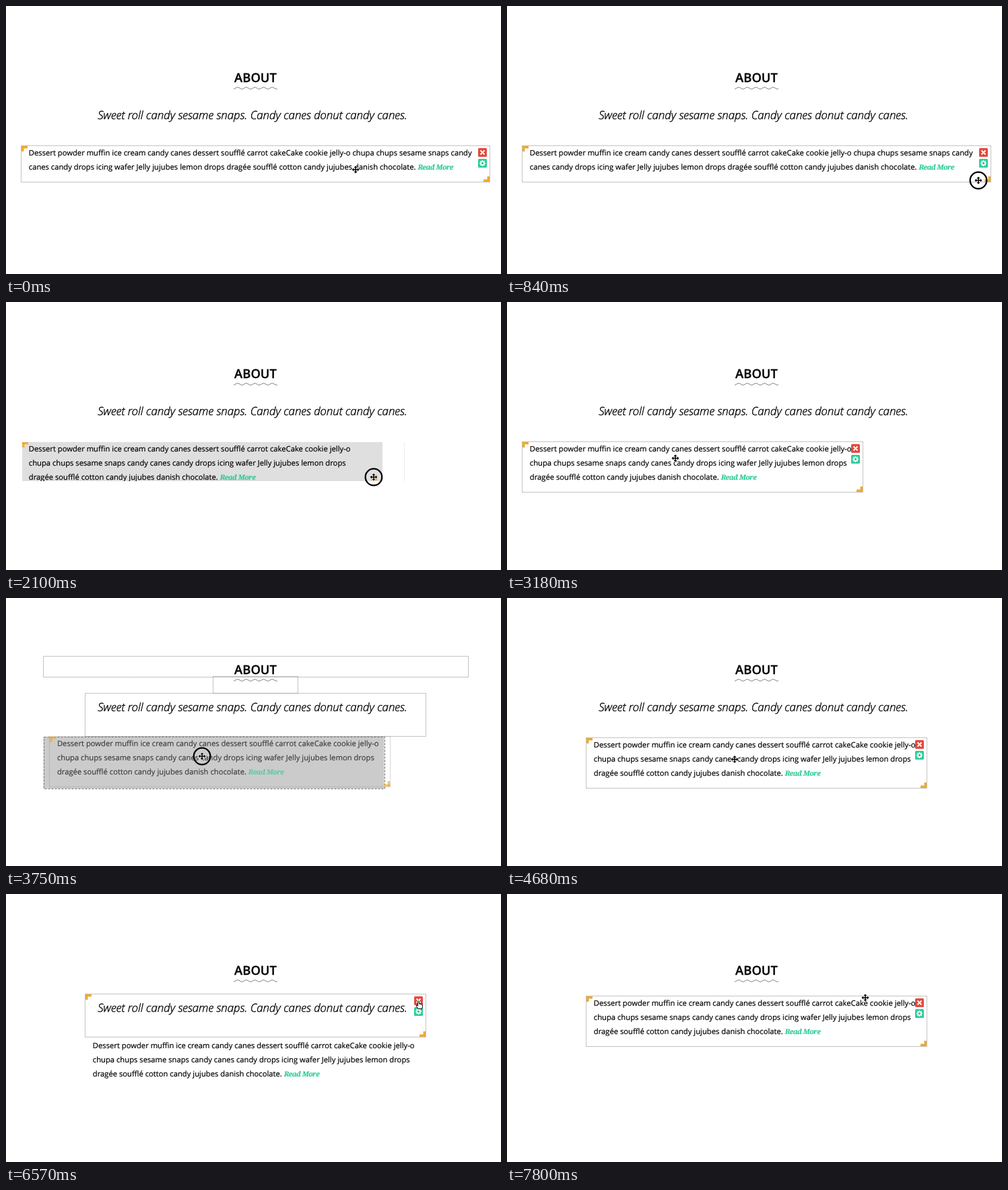
An HTML page with a canvas that plays this animation: 735 by 398 pixels, repeating every 7.83 s.

```html
<!DOCTYPE html>
<html lang="en">
<head>
<meta charset="utf-8">
<title>Block editor</title>
<style>
  html, body { margin: 0; width: 100%; height: 100%; overflow: hidden; background: #fff; }
  canvas { display: block; width: 735px; height: 398px; }
</style>
</head>
<body>
<canvas id="stage" width="735" height="398"></canvas>
<script>
const ctx = document.getElementById('stage').getContext('2d');
const LOOP = 7830;
const COLUMN = 63.2;
const INK = '#000', ORANGE = '#efaa2f', RED = '#e24b40', GREEN = '#2fcb9b';
const SANS = '"Open Sans", sans-serif';
const BODY_FONT = '11.24px ' + SANS;
const LINK_FONT = 'italic bold 10.5px "Noto Serif", serif';
const LINK = 'Read More';
const WORDS = ('Dessert powder muffin ice cream candy canes dessert soufflé carrot cakeCake cookie ' +
  'jelly-o chupa chups sesame snaps candy canes candy drops icing wafer Jelly jujubes lemon drops ' +
  'dragée soufflé cotton candy jujubes danish chocolate.').split(' ').concat(LINK);

// Moments of the story, in ms
const RESIZE = [900, 2500];
const MOVE = [3280, 4020];
const PUSH = [4900, 5290];
const PRESSES = [[640, 2500], [3250, 4020], [4880, 5290], [6680, 6790]];
const REMOVE = 6740, COLLAPSE = [6830, 7080];

const POINTER = [
  [0, 519, 243], [560, 711, 260], [700, 714, 260], [840, 700, 259], [1650, 611, 260],
  [2100, 546, 260], [2430, 521, 261], [2520, 518, 261], [3180, 250, 232], [3280, 249, 237],
  [3750, 291, 235], [3980, 338, 238], [4050, 338, 238], [4530, 337, 241], [4680, 338, 240],
  [4860, 350, 107], [4900, 350, 107], [5090, 352, 198], [5280, 351, 114], [5400, 353, 115],
  [5640, 400, 150], [6120, 520, 172], [6480, 613, 163], [6570, 614, 164], [6930, 621, 167],
  [7350, 580, 196], [7800, 532, 154], [7830, 532, 154]
];

const during = (t, [from, to]) => t >= from && t < to;
const clamp = v => Math.max(0, Math.min(1, v));
const smooth = v => v * v * (3 - 2 * v);
const moved = (r, dy) => ({ ...r, y: r.y + dy });
const inside = (p, r) => p.x >= r.x && p.x <= r.x + r.w && p.y >= r.y && p.y <= r.y + r.h;

const TITLE = { x: 55, y: 86, w: 631, h: 31 };
const DIVIDER = { x: 307, y: 116, w: 126, h: 25 };
const TAGLINE = { x: 117, y: 141, w: 506, h: 64 };
const TEXT_WIDE = { x: 22, y: 207, w: 696, h: 54 };
const TEXT_SLIM = { x: 22, y: 207, w: 506, h: 75 };
const TEXT_END = { ...TEXT_SLIM, x: 117 };

function pointerAt(t) {
  const i = Math.max(1, POINTER.findIndex(k => k[0] > t));
  const [a, b] = [POINTER[i - 1], POINTER[i]];
  const k = clamp((t - a[0]) / (b[0] - a[0]));
  const e = (k + smooth(k)) / 2;
  return { x: a[1] + (b[1] - a[1]) * e, y: a[2] + (b[2] - a[2]) * e };
}

function line(points, color, width) {
  ctx.beginPath();
  points.forEach(([x, y]) => ctx.lineTo(x, y));
  ctx.strokeStyle = color;
  ctx.lineWidth = width;
  ctx.stroke();
}

function outline(r, color = '#888', dash = [1, 1]) {
  ctx.save();
  ctx.setLineDash(dash);
  ctx.strokeStyle = color;
  ctx.lineWidth = 1;
  ctx.strokeRect(Math.round(r.x) + .5, Math.round(r.y) + .5, Math.round(r.w), Math.round(r.h));
  ctx.restore();
}

function corners(r) {
  const right = r.x + r.w, bottom = r.y + r.h;
  ctx.fillStyle = ORANGE;
  ctx.fillRect(r.x + 1, r.y + 1, 9, 3.5);
  ctx.fillRect(r.x + 1, r.y + 1, 3.5, 8);
  ctx.fillRect(right - 9, bottom - 3.5, 9, 3.5);
  ctx.fillRect(right - 3.5, bottom - 8, 3.5, 8);
}

function button(x, y, color) {
  ctx.fillStyle = color;
  ctx.beginPath();
  ctx.roundRect(x, y, 13, 13, 1.5);
  ctx.fill();
}

function buttons(r) {
  const x = r.x + r.w - 17, y = r.y + 4, cx = x + 6.5;
  button(x, y, RED);
  for (const s of [-1, 1]) line([[cx - 3, y + 6.5 - 3 * s], [cx + 3, y + 6.5 + 3 * s]], '#fff', 1.8);
  button(x, y + 16, GREEN);
  const cy = y + 22.5;
  for (let i = 0; i < 8; i++) {
    const c = Math.cos(i * Math.PI / 4), s = Math.sin(i * Math.PI / 4);
    line([[cx + c * 2.5, cy + s * 2.5], [cx + c * 4.6, cy + s * 4.6]], '#fff', 1.5);
  }
  ctx.beginPath();
  ctx.arc(cx, cy, 2.5, 0, 7);
  ctx.stroke();
}

function hoverFrame(r) {
  outline(r);
  corners(r);
  buttons(r);
}

function setFont(font, spacing = '0px') {
  ctx.font = font;
  ctx.letterSpacing = spacing;
}

const bodyFont = word => word === LINK ? setFont(LINK_FONT, '-0.55px') : setFont(BODY_FONT);

// A hairline stroke gives the slightly heavier look of smoothed type
function print(text, x, y, color, weight = .2) {
  ctx.fillStyle = ctx.strokeStyle = color;
  ctx.lineWidth = weight;
  ctx.fillText(text, x, y);
  ctx.strokeText(text, x, y);
}

function paragraph(x, baseline, maxWidth) {
  bodyFont('');
  const space = ctx.measureText(' ').width;
  const rows = [[]];
  let used = 0;
  for (const word of WORDS) {
    bodyFont(word);
    const width = ctx.measureText(word).width;
    if (used + width > maxWidth) { rows.push([]); used = 0; }
    rows[rows.length - 1].push(word);
    used += width + space;
  }
  ctx.textAlign = 'left';
  rows.forEach((row, i) => {
    const y = baseline + i * 21;
    const hasLink = row[row.length - 1] === LINK;
    const plain = (hasLink ? row.slice(0, -1) : row).join(' ') + ' ';
    bodyFont('');
    print(plain, x, y, INK);
    if (!hasLink) return;
    const end = x + (plain === ' ' ? 0 : ctx.measureText(plain).width);
    bodyFont(LINK);
    print(LINK, end, y, GREEN);
  });
}

const paragraphIn = r => paragraph(r.x + 11.8, r.y + 15, r.w - 23);

function centered(text, x, y, font, weight) {
  setFont(font);
  ctx.textAlign = 'center';
  print(text, x, y, INK, weight);
}

function heading(dy) {
  centered('ABOUT', 370.5, 113.3 + dy, '600 18.4px ' + SANS, .3);
}

function wave(dy) {
  const points = [];
  for (let x = 338; x <= 403; x++) points.push([x, 122 + dy - 1.3 * Math.cos((x - 344) * Math.PI / 6.4)]);
  line(points, '#777', .9);
}

function tagline(dy) {
  centered('Sweet roll candy sesame snaps. Candy canes donut candy canes.', 366, 168 + dy,
    'italic 300 16.86px ' + SANS, .4);
}

function moveCursor({ x, y }, pressed) {
  for (const [color, grow] of [['#fff', 1], ['#000', 0]]) {
    for (let i = 0; i < 4; i++) {
      ctx.save();
      ctx.translate(x, y);
      ctx.rotate(i * Math.PI / 2);
      line([[0, 0], [4, 0]], color, 1.5 + grow * 1.5);
      ctx.beginPath();
      ctx.moveTo(5.5 + grow, 0);
      ctx.lineTo(2.8 - grow * .5, -2.6 - grow);
      ctx.lineTo(2.8 - grow * .5, 2.6 + grow);
      ctx.fillStyle = color;
      ctx.fill();
      ctx.restore();
    }
  }
  if (pressed) ring(x, y);
}

function ring(x, y) {
  ctx.beginPath();
  ctx.arc(x, y, 12.3, 0, 7);
  ctx.strokeStyle = '#000';
  ctx.lineWidth = 2.3;
  ctx.stroke();
}

function handCursor({ x, y }, pressed) {
  ctx.save();
  ctx.translate(x, y);
  ctx.beginPath();
  ctx.moveTo(-2.5, 1);
  ctx.lineTo(-2.5, -4.5);
  ctx.quadraticCurveTo(-1.5, -6, -.5, -4.5);
  ctx.lineTo(-.5, -1);
  ctx.lineTo(4, 0);
  ctx.quadraticCurveTo(5.2, 3, 3.5, 6.5);
  ctx.lineTo(-2, 6.5);
  ctx.lineTo(-5, 2);
  ctx.quadraticCurveTo(-5, 0, -2.5, 2);
  ctx.closePath();
  ctx.fillStyle = '#fff';
  ctx.fill();
  ctx.strokeStyle = '#000';
  ctx.lineWidth = 1;
  ctx.stroke();
  ctx.restore();
  if (pressed) ring(x, y);
}

function resizing(p) {
  const r = { x: 24, y: 208, w: p.x + 13 - 24, h: p.y + 6 - 208 };
  const snapped = 22 + COLUMN * Math.ceil((r.x + r.w - 22) / COLUMN);
  const edge = Math.round(Math.min(718, snapped)) + .5;
  line([[edge, r.y], [edge, r.y + r.h]], '#ececec', 1);
  ctx.fillStyle = '#dfdfdf';
  ctx.fillRect(r.x, r.y, r.w, r.h);
  ctx.save();
  ctx.beginPath();
  ctx.rect(r.x, r.y, r.w, r.h);
  ctx.clip();
  ctx.globalAlpha = .85;
  corners({ ...r, x: r.x - 1, y: r.y - 1, w: r.w - 7, h: r.h });
  ctx.globalAlpha = 1;
  paragraph(33.8, 222, r.w - 27);
  ctx.restore();
}

function placeholder(r) {
  ctx.fillStyle = '#cbcbcb';
  ctx.fillRect(r.x, r.y, r.w, r.h);
  outline(r, '#777', [3, 2]);
}

function moving(p) {
  const dx = p.x - 249, half = COLUMN / 2;
  [TITLE, DIVIDER, TAGLINE].forEach(r => outline(r));
  placeholder({ x: 24 + half * Math.round(dx / half), y: 206, w: 506, h: 77 });
  const r = { ...TEXT_SLIM, x: 22 + dx, y: 207 + p.y - 237 };
  ctx.globalAlpha = .65;
  outline(r);
  corners(r);
  paragraphIn(r);
  ctx.globalAlpha = 1;
}

function draw(t) {
  const p = pointerAt(t);
  const pushing = during(t, PUSH);
  const dy = t < PUSH[0] ? 0 : pushing ? Math.max(0, p.y - 107) : 7;
  const lift = 63 * smooth(clamp((t - COLLAPSE[0]) / (COLLAPSE[1] - COLLAPSE[0])));
  const titleBox = moved(TITLE, dy), taglineBox = moved(TAGLINE, dy);
  const base = t < RESIZE[0] ? TEXT_WIDE : t < MOVE[0] ? TEXT_SLIM : TEXT_END;
  const textBox = moved(base, dy - lift);

  ctx.globalAlpha = 1;
  ctx.fillStyle = '#fff';
  ctx.fillRect(0, 0, 735, 398);

  if (pushing) {
    placeholder(titleBox);
    [DIVIDER, TAGLINE, TEXT_END].forEach(r => outline(moved(r, dy)));
    ctx.globalAlpha = .65;
  }
  heading(dy);
  ctx.globalAlpha = 1;
  wave(dy);

  ctx.globalAlpha = 1 - clamp((t - REMOVE) / (COLLAPSE[0] - REMOVE));
  if (ctx.globalAlpha > 0) {
    tagline(dy);
    if (t > PUSH[1] && inside(p, taglineBox)) hoverFrame(taglineBox);
  }
  ctx.globalAlpha = 1;

  if (during(t, RESIZE)) resizing(p);
  else if (during(t, MOVE)) moving(p);
  else {
    paragraphIn(textBox);
    if (!pushing && inside(p, textBox)) hoverFrame(textBox);
  }
  if (t > 4800 && t < 5700 && !pushing && inside(p, titleBox)) hoverFrame(titleBox);

  const pressed = PRESSES.some(span => during(t, span));
  const cursor = during(t, [6430, 6990]) ? handCursor : moveCursor;
  cursor(p, pressed);
}

ctx.textRendering = 'geometricPrecision';
ctx.lineJoin = 'round';
const start = performance.now();
function tick() {
  draw((performance.now() - start) % LOOP);
  requestAnimationFrame(tick);
}
tick();
</script>
</body>
</html>
```
